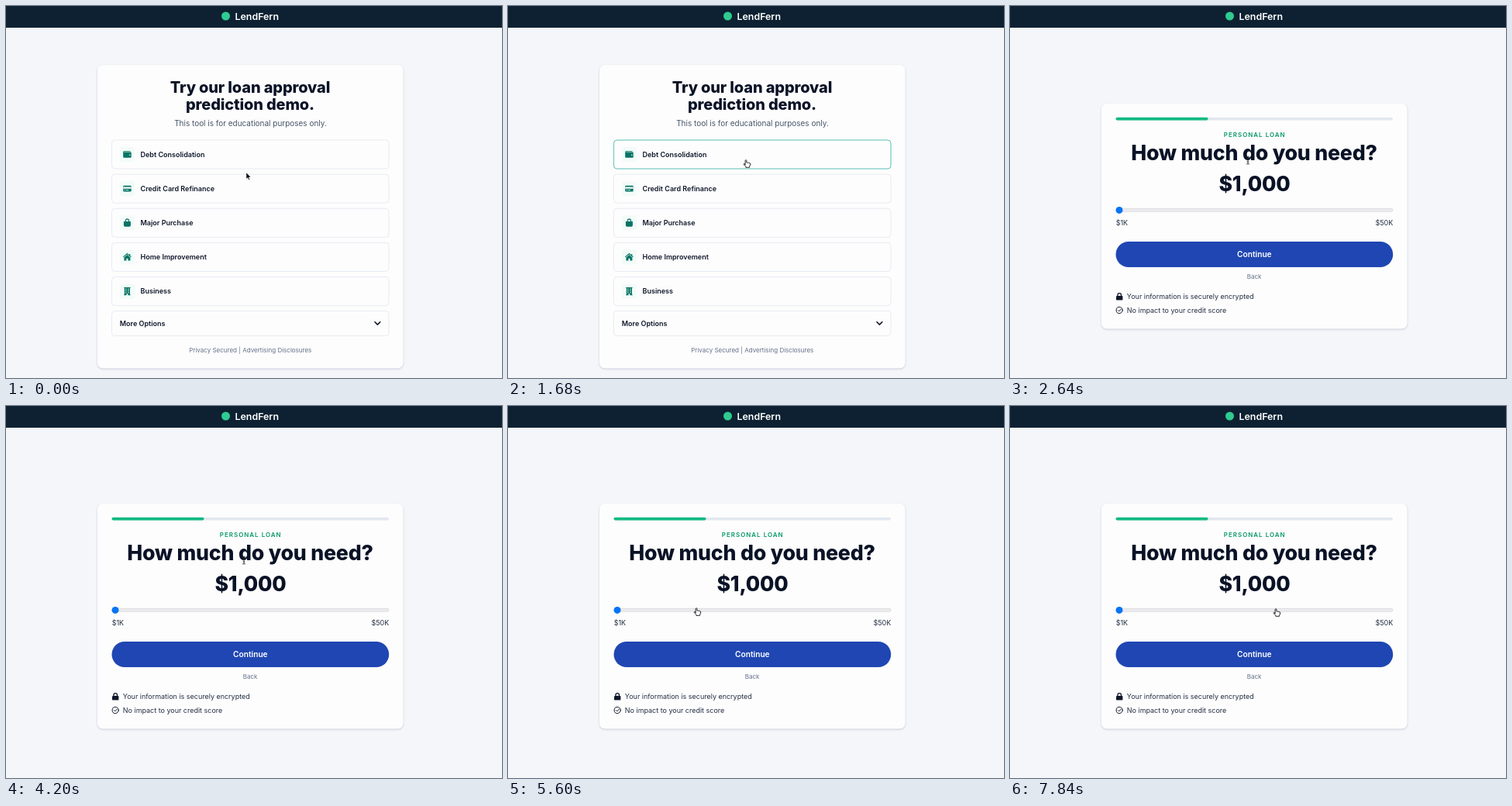
Animation, 640 px wide and 480 px high, one loop 8000 ms. Source, as an HTML page:

```html
<!DOCTYPE html>
<html lang="en">
<head>
<meta charset="utf-8">
<title>Loan demo</title>
<style>
  html, body { margin: 0; width: 100%; height: 100%; overflow: hidden; background: #f4f6f9; }
  svg { display: block; width: 640px; height: 480px; }
  text { font-family: Inter, Roboto, sans-serif; font-optical-sizing: none; font-size: 8.97px; fill: #222e42; }
  .mid { text-anchor: middle; }
  .title, .big { font-weight: 800; letter-spacing: -.0075em; fill: #0a1226; }
  .title { font-size: 20px; }
  .big { font-size: 26.7px; }
  .label { font-size: 9px; font-weight: 600; fill: #0f172a; }
  .small { font-size: 8px; fill: #64708a; }
  .card { fill: #fdfdfd; filter: drop-shadow(0 1px 1.2px #9aa0c080); }
  .box { fill: #fdfdfd; stroke: #e8ebf3; }
  .icon { fill: #067464; }
  .cut { fill: #f2fbf8; }
  .line { fill: none; stroke: #0f172a; stroke-linecap: round; stroke-linejoin: round; }
</style>
</head>
<body>
<svg viewBox="0 0 640 480">
  <rect width="640" height="480" fill="#f4f6f9"/>
  <rect width="640" height="28" fill="#0d2132"/>
  <circle cx="283.5" cy="13" r="5.5" fill="#2fcb90"/>
  <text x="295.5" y="17.5" style="font-size:12.4px;font-weight:600;fill:#fff">LendFern</text>

  <g id="purpose">
    <rect class="card" x="118" y="76" width="394.5" height="391.5" rx="7"/>
    <text class="mid title" x="315" y="111.5">Try our loan approval</text>
    <text class="mid title" x="315" y="133.6">prediction demo.</text>
    <text class="mid" x="315.5" y="155.3" style="font-size:9.97px;fill:#475569">This tool is for educational purposes only.</text>
    <g id="options"></g>
    <rect id="hover" x="136.5" y="173" width="357.5" height="37" rx="4" fill="none" stroke="#62c6b8"/>
    <rect class="box" x="136.5" y="393.5" width="357.5" height="32" rx="4"/>
    <text class="label" x="146.8" y="412.7">More Options</text>
    <path class="line" d="M476 407.7l3.4 3.4 3.4-3.4" stroke-width="1.6"/>
    <text class="mid small" x="315.3" y="447">Privacy Secured | Advertising Disclosures</text>
  </g>

  <g id="amount">
    <rect class="card" x="118" y="126" width="394.5" height="290.5" rx="7"/>
    <rect x="136.5" y="143.8" width="357.5" height="3.6" rx="1.8" fill="#e2e8f0"/>
    <rect x="136.5" y="143.8" width="119" height="3.6" rx="1.8" fill="#10b981"/>
    <text class="mid" x="315.7" y="169" style="font-size:7.9px;font-weight:600;letter-spacing:1.05px;fill:#059669">PERSONAL LOAN</text>
    <text class="mid big" x="315" y="199.4">How much do you need?</text>
    <text class="mid big" x="315.5" y="239">$1,000</text>
    <rect x="137" y="261.3" width="357" height="4" rx="2" fill="#ececee" stroke="#cfcfd4" stroke-width=".6"/>
    <circle cx="141" cy="263.4" r="4.5" fill="#0875f5"/>
    <text x="136.7" y="283">$1K</text>
    <text x="494.3" y="283" text-anchor="end">$50K</text>
    <rect x="136.5" y="304" width="357.7" height="33" rx="16.5" fill="#1f46b2"/>
    <text class="mid" x="315.3" y="324.3" style="font-size:10.2px;font-weight:600;fill:#fff">Continue</text>
    <text class="mid small" x="315" y="352">Back</text>
    <rect x="137" y="374" width="8.4" height="5.6" rx="1.2" fill="#0f172a"/>
    <path class="line" d="M138.9 374.5v-1.6a2.3 2.3 0 0 1 4.6 0v1.6" stroke-width="1.3"/>
    <text x="150.8" y="378.2">Your information is securely encrypted</text>
    <circle class="line" cx="141.2" cy="392.5" r="4.1"/>
    <path class="line" d="M139.3 392.6l1.4 1.4 2.5-2.8"/>
    <text x="150.8" y="395.7">No impact to your credit score</text>
  </g>

  <g id="cursor" stroke-linejoin="round" stroke-linecap="round">
    <path id="arrow" d="M0 0v8.3l1.9-1.8 1.4 3.1 1.3-.6-1.4-3h2.6z" fill="#000" stroke="#fff" stroke-width=".5"/>
    <path id="hand" d="M-.9 6.6V1.6a.9.9 0 0 1 1.8 0v2.5q.9-.6 1.6.2.9-.5 1.5.3 1.6-.3 1.6 1.2 0 2.5-1.1 3.3v1.2H-.2V9.2L-2.8 6.5q-.3-1.3.8-1z" fill="#fff" stroke="#111" stroke-width=".9"/>
    <path id="beam" d="M-1.6-5Q0-5 0-4Q0-5 1.6-5M0-4V4M-1.6 5Q0 5 0 4Q0 5 1.6 5M-1 2H1" fill="none" stroke="#222" stroke-width=".8"/>
  </g>
</svg>
<script>
const $ = id => document.getElementById(id);
const LOOP = 8000, PAGE_SWITCH = 2500;

// Icons are drawn around their own centre
const options = [
  ["Debt Consolidation", `<path d="M-4.2-4.2H4v1.2h.3q1 0 1 1V3.2q0 1-1 1h-8.5q-1 0-1-1v-6.4q0-1 1-1z"/><path class="cut" d="M-4-3.1H4v.5H-4z"/><circle class="cut" cx="3.3" cy=".8" r=".8"/>`],
  ["Credit Card Refinance", `<rect x="-5.2" y="-3.9" width="10.4" height="7.8" rx="1"/><path class="cut" d="M-5.2-2.1H5.2V0H-5.2zM-3.9 1.6h1.8v.8h-1.8zM-1.4 1.6h3.2v.8h-3.2z"/>`],
  ["Major Purchase", `<path d="M-4.5-1.9h9v5.2q0 1.7-1.7 1.7h-5.6q-1.7 0-1.7-1.7z"/><path d="M-2.1-.8v-2a2.1 2.1 0 0 1 4.2 0v2" fill="none" stroke="#067464" stroke-width="1.1"/>`],
  ["Home Improvement", `<path d="M0-3L4 .6V4.6H1V1.8H-1V4.6H-4V.6z"/><path d="M-5.1 0L0-4.4 5.1 0M3.3-4v2" fill="none" stroke="#067464" stroke-width="1.1"/>`],
  ["Business", `<path d="M-4.2-5.2h8.4v1h-.6v8.4h.6v1H.9V3.2H-.9v2h-3.3v-1h.6v-8.4h-.6z"/><path class="cut" d="M-2.2-3.6h1.2v1.2h-1.2zM1-3.6h1.2v1.2H1zM-2.2-1.3H-1v1.2h-1.2zM1-1.3h1.2v1.2H1zM-2.2 1H-1v1.2h-1.2zM1 1h1.2v1.2H1z"/>`],
];
$("options").innerHTML = options.map(([name, icon], i) => `
  <g transform="translate(0 ${i * 44.15})">
    <rect class="box" x="136.5" y="173" width="357.5" height="37" rx="4"/>
    <rect class="cut" x="147" y="182" width="19" height="19" rx="3"/>
    <g class="icon" transform="translate(156.4 191.5)">${icon}</g>
    <text class="label" x="173.5" y="194.8">${name}</text>
  </g>`).join("");

// Pointer moves: start, end, target x, target y
const moves = [
  [480, 1100, 307, 198],
  [2500, 2560, 307, 199],
  [4200, 5160, 243, 260],
  [5580, 5900, 248, 265],
  [7000, 7840, 343, 261],
];
const progress = (t, a, b) => Math.min(1, Math.max(0, (t - a) / (b - a)));
const ease = u => u * u * (3 - 2 * u);

function pointer(t) {
  let x = 310, y = 215;
  for (const [a, b, toX, toY] of moves) {
    const k = ease(progress(t, a, b));
    x += (toX - x) * k;
    y += (toY - y) * k;
  }
  return [x, y];
}

function shape(firstPage, y) {
  if (firstPage) return y < 210 ? "hand" : "arrow";
  return y < 241 ? "beam" : y < 258 ? "arrow" : "hand";
}

const show = (id, on) => $(id).setAttribute("visibility", on ? "visible" : "hidden");

function draw(now) {
  const t = now % LOOP, firstPage = t < PAGE_SWITCH;
  const [x, y] = pointer(t), current = shape(firstPage, y);
  show("purpose", firstPage);
  show("amount", !firstPage);
  for (const id of ["arrow", "hand", "beam"]) show(id, id === current);
  $("hover").setAttribute("opacity", ease(progress(t, 760, 960)));
  $("cursor").setAttribute("transform", `translate(${x} ${y})`);
  requestAnimationFrame(draw);
}
draw(0);
</script>
</body>
</html>
```
